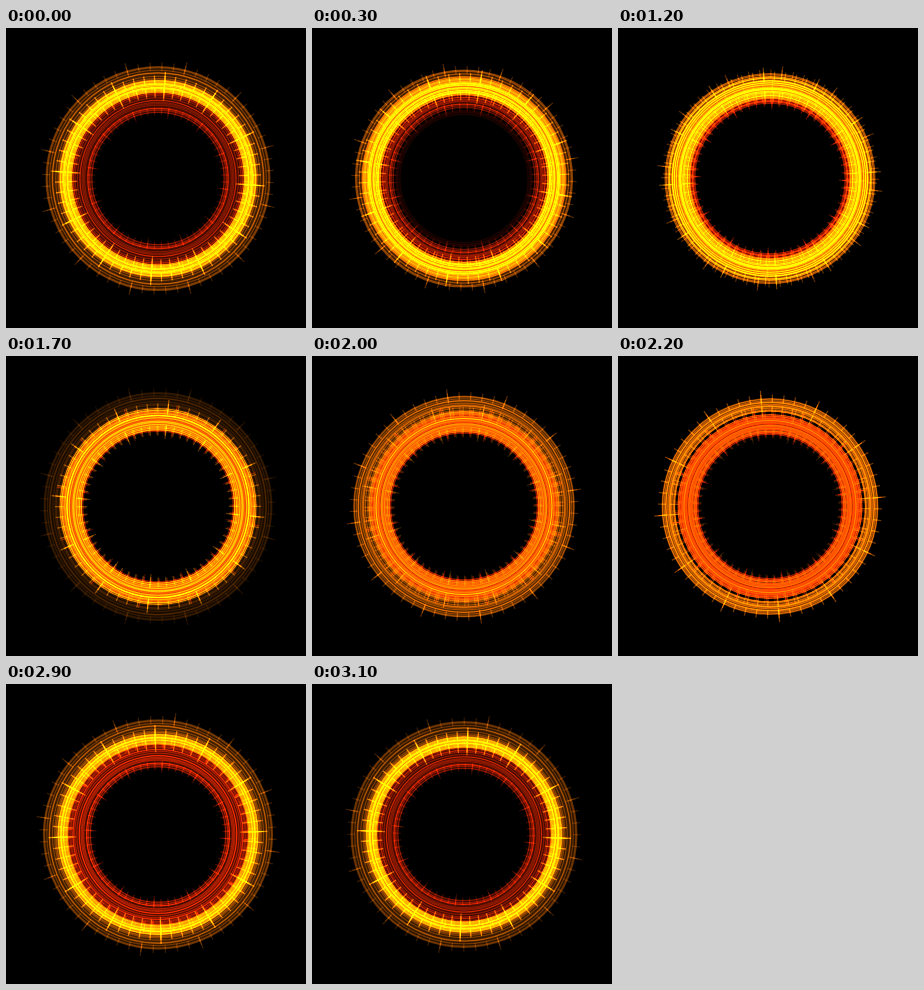
An HTML page with a canvas for the animation above (3200 ms loop, 300x300 px).

```html
<!DOCTYPE html>
<html lang="en">
<head>
<meta charset="utf-8">
<title>Fire dial</title>
<style>
html, body { margin: 0; width: 100%; height: 100%; overflow: hidden; background: #000; }
canvas { display: block; width: 100vmin; height: 100vmin; }
</style>
</head>
<body>
<canvas id="stage" width="300" height="300"></canvas>
<script>
const ctx = document.getElementById('stage').getContext('2d');
const LOOP = 3200, STEP = 100, TAU = Math.PI * 2, DEG = Math.PI / 180;
const times = [0, 700, 1200, 1700, 2200, 2600, 2850, 3100, LOOP];

// Each key holds inner radius, outer radius and light.
const bands = [
  { color: '255,42,0', phase: 9, lines: 17, seed: 3, reach: 3,
    keys: [[66, 92, .42], [77, 95, .6], [75, 92, .8], [75, 96, .65],
           [72, 92, .85], [70, 93, .85], [68, 92, .6], [66, 91, .45]] },
  { color: '255,120,0', phase: 14, lines: 13, seed: 11, reach: 4,
    keys: [[90, 112, .42], [79, 104, .62], [80, 105, .6], [94, 114, .17],
           [95, 108, .85], [91, 104, .42], [95, 115, .42], [91, 113, .37]] },
  { color: '255,145,0', phase: 4, lines: 12, seed: 29, reach: 5,
    keys: [[86, 98, 1.15], [80, 104, .72], [82, 102, .72], [76, 98, .82],
           [73, 92, .3], [94, 104, .95], [91, 101, 1.05], [87, 98, 1.15]] },
  { color: '255,30,0', phase: 0, lines: 3, seed: 41, reach: 0,
    keys: [[66, 72, .12], [61, 64, .1], [60, 62, 0], [60, 62, 0],
           [68, 72, 0], [68, 72, 0], [67, 72, .05], [66, 72, .1]] }
];

function random(seed) {
  return () => {
    seed = (seed * 16807) % 2147483647;
    return seed / 2147483647;
  };
}

for (const band of bands) {
  const next = random(band.seed * 7919);
  band.offsets = Array.from({ length: band.lines }, (_, i) =>
    Math.min(1, Math.max(0, (i + (next() - .5) * 1.1) / (band.lines - 1))));
}

function pose(keys, t) {
  const i = times.findIndex(end => t < end) - 1;
  const from = keys[i], to = keys[(i + 1) % keys.length];
  const k = (t - times[i]) / (times[i + 1] - times[i]);
  return from.map((value, n) => value + (to[n] - value) * k);
}

function ring(radius, width, color, alpha) {
  ctx.strokeStyle = `rgba(${color},${Math.min(1, alpha)})`;
  ctx.lineWidth = width;
  ctx.beginPath();
  ctx.arc(0, 0, radius, 0, TAU);
  ctx.stroke();
}

function ticks(count, angle, from, to, color, alpha) {
  ctx.strokeStyle = `rgba(${color},${Math.min(1, alpha)})`;
  ctx.lineWidth = 1.2;
  ctx.beginPath();
  for (let i = 0; i < count; i++) {
    const a = angle + i * TAU / count;
    ctx.moveTo(Math.sin(a) * from, -Math.cos(a) * from);
    ctx.lineTo(Math.sin(a) * to, -Math.cos(a) * to);
  }
  ctx.stroke();
}

function drawBand(band, t) {
  const [inner, outer, light] = pose(band.keys, t);
  if (light <= 0) return;
  const { color, reach } = band, width = outer - inner;
  const angle = (band.phase + 60 * t / LOOP) * DEG;
  ring((inner + outer) / 2, width, color, light * .4);
  ring((inner + outer) / 2, width * .55, color, light * .15);
  const lineLight = light * .52 * width / (band.lines * 1.1);
  for (const k of band.offsets) ring(inner + width * k, 1.1, color, lineLight);
  if (!reach) return;
  ticks(60, angle, outer - 4, outer + reach, color, light * .55);
  ticks(12, angle, outer - 6, outer + reach + 4, color, light * .6);
  ticks(60, angle, inner - reach, inner + 5, color, light * .5);
  ticks(12, angle, inner - reach - 3, inner + 6, color, light * .4);
}

function draw(now) {
  const t = Math.floor(now % LOOP / STEP) * STEP;
  ctx.setTransform(1, 0, 0, 1, 0, 0);
  ctx.globalCompositeOperation = 'source-over';
  ctx.fillStyle = '#000';
  ctx.fillRect(0, 0, 300, 300);
  ctx.translate(152, 150.5);
  ctx.globalCompositeOperation = 'lighter';
  for (const band of bands) drawBand(band, t);
}

const start = performance.now();
function tick() {
  draw(performance.now() - start);
  requestAnimationFrame(tick);
}
tick();
</script>
</body>
</html>
```
